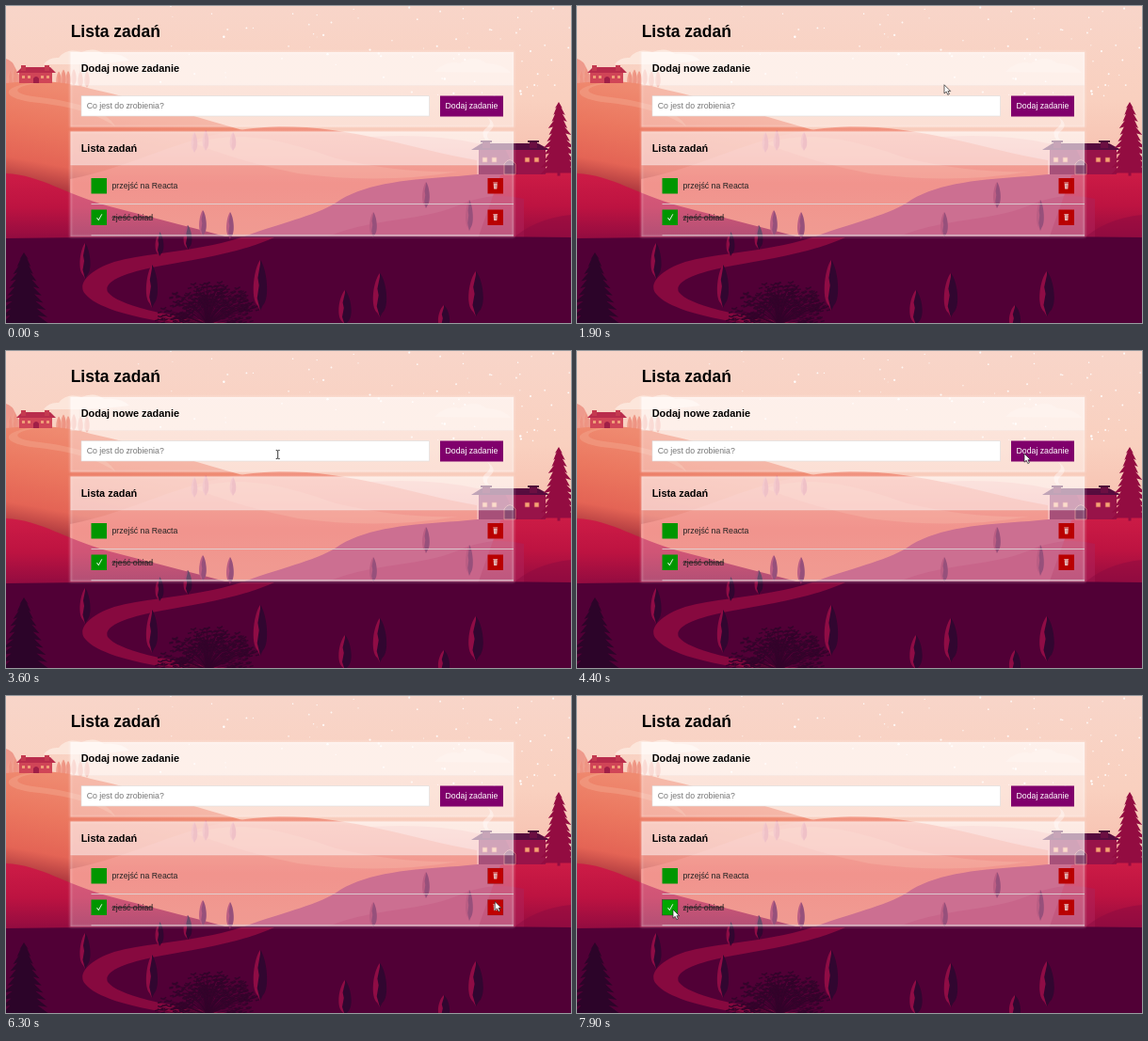
Write an HTML page that moves like this. It is 600 by 337 pixels and loops after 8 s.

```html
<!DOCTYPE html>
<html lang="pl">
<head>
<meta charset="utf-8">
<style>
  html, body { margin: 0; width: 100%; height: 100%; overflow: hidden; }
  svg { display: block; width: 100vw; height: 100vh; }
  text { font: 8.74px "Liberation Sans", Arial, sans-serif; fill: #222; }
  .head { font-size: 10.93px; font-weight: bold; fill: #000; }
  .title { font-size: 17.48px; font-weight: bold; fill: #000; }
  .small { stroke: #222; stroke-width: .7; stroke-opacity: 0; }
</style>
</head>
<body>
<svg viewBox="0 0 600 337" preserveAspectRatio="none">
  <defs>
    <linearGradient id="sky" x2="0" y2="1">
      <stop stop-color="#f8d5c9"/><stop offset=".5" stop-color="#f9d0bf"/><stop offset="1" stop-color="#f6b9a8"/>
    </linearGradient>
    <linearGradient id="left" gradientUnits="userSpaceOnUse" x1="30" y1="80" x2="10" y2="190">
      <stop stop-color="#ef8a70"/><stop offset=".4" stop-color="#eb775f"/><stop offset=".75" stop-color="#e46455"/><stop offset="1" stop-color="#a9343c"/>
    </linearGradient>
    <linearGradient id="mid" x2="0" y2="1">
      <stop stop-color="#f08e78"/><stop offset=".5" stop-color="#eb6a61"/><stop offset="1" stop-color="#ea7568"/>
    </linearGradient>
    <linearGradient id="far" x2="0" y2="1">
      <stop stop-color="#f4b0a4"/><stop offset="1" stop-color="#e8737c"/>
    </linearGradient>
    <linearGradient id="red" x2="0" y2="1">
      <stop stop-color="#cd1c46"/><stop offset=".5" stop-color="#bd1341"/><stop offset="1" stop-color="#8f0b40"/>
    </linearGradient>
    <filter id="soft" x="-5%" y="-10%" width="110%" height="120%"><feGaussianBlur stdDeviation="1.2"/></filter>
  </defs>

  <rect width="600" height="200" fill="url(#sky)"/>
  <g id="stars" fill="#fff"></g>
  <g fill="#fdeae0" opacity=".85">
    <path d="M40 62Q46 54 56 55Q64 44 80 49Q94 43 104 51Q122 49 131 58Q100 62 80 62Z"/>
    <path d="M455 70Q468 57 482 61Q497 51 510 61Q527 61 536 71Z" opacity=".4"/>
  </g>

  <path d="M0 56Q7 58 10 66Q14 76 24 84H0Z" fill="#ee9a8c"/>
  <path d="M300 150Q420 128 500 146Q560 152 600 160V220H300Z" fill="url(#far)"/>
  <g id="grove"></g>
  <path d="M0 82Q50 76 90 88C170 106 230 128 320 150L420 190V250H0Z" fill="url(#left)"/>
  <path d="M32 82C8 86 2 93 36 97C76 102 108 112 116 128C92 112 64 106 26 102C-6 97 -4 86 26 82Z" fill="#f3a58c" opacity=".5"/>
  <path d="M68 184C150 168 190 132 290 128C370 128 430 152 500 164V250H68Z" fill="url(#mid)"/>
  <path d="M200 146C250 130 300 144 350 162Q420 178 480 176Q400 190 310 178Q250 166 200 146Z" fill="#f5b39b" opacity=".25"/>
  <path d="M0 178C38 180 62 200 110 213S210 238 250 250H0Z" fill="url(#red)"/>
  <path d="M240 250C290 230 330 224 355 206C385 188 430 184 480 181Q540 174 600 178V250Z" fill="#b83766"/>
  <path d="M525 180Q560 172 600 177V250H500Z" fill="url(#red)"/>
  <path d="M330 250C390 222 440 232 490 208Q520 198 550 205V250Z" fill="#b02058" opacity=".6"/>
  <path d="M535 250Q560 226 600 222V250Z" fill="#8d0a40" opacity=".5"/>

  <path d="M502 153H572V179H502Z" fill="#850c45"/>
  <path d="M530 152H573V179H543Z" fill="#981349"/>
  <path d="M494 153L505 146H565L578 153Z" fill="#560c3e"/>
  <path d="M506 143H514V151H506ZM556 143H564V151H556Z" fill="#6c0f42"/>
  <path d="M504 143H516V145H504ZM554 143H566V145H554Z" fill="#4d0838"/>
  <path d="M529 179V168Q535 159 541 168V179Z" fill="#5c073c" stroke="#d57577" stroke-width=".8"/>
  <path d="M506 161h5v5h-5zM516 161h5v5h-5zM551 161h5v5h-5zM561 161h5v5h-5z" fill="#f4a575" stroke="#b8354f" stroke-width=".7"/>
  <path d="M509 142Q503 134 511 129Q517 124 511 118Q522 125 515 132Q508 137 513 142Z" fill="#fff" opacity=".4"/>

  <path d="M14 70H49V82H14Z" fill="#d04557"/>
  <path d="M11 71L17 65H47L53 71Z" fill="#b92c4c"/>
  <path d="M16 63H21V69H16ZM41 63H46V69H41Z" fill="#c43a50"/>
  <path d="M17 74h3v3h-3zM23 74h3v3h-3zM37 74h3v3h-3zM43 74h3v3h-3z" fill="#ef9d78"/>
  <path d="M29 82V77Q32 73 35 77V82Z" fill="#a01f47"/>

  <path d="M0 247Q300 243 600 246V337H0Z" fill="#510036"/>
  <path d="M250 246C200 262 150 262 115 272C85 282 76 297 84 306C95 320 130 330 175 337H235C170 330 118 318 108 304C103 293 125 284 160 277C205 269 250 262 285 246Z" fill="#87093f"/>
  <g id="trees"></g>
  <g id="bush" stroke="#33042b" fill="none"></g>

  <g fill="none" stroke="#fff" stroke-opacity=".35" stroke-width="1.6" filter="url(#soft)">
    <rect x="68.5" y="49" width="470.5" height="79.5"/>
    <rect x="68.5" y="133.5" width="470.5" height="111.5"/>
  </g>
  <g fill="#fff">
    <rect x="68.5" y="49" width="470.5" height="79.5" fill-opacity=".4"/>
    <rect x="68.5" y="133.5" width="470.5" height="111.5" fill-opacity=".28"/>
    <path d="M68.5 49H539V84H68.5Z" fill-opacity=".42"/>
    <path d="M68.5 133.5H539V169H68.5Z" fill-opacity=".48"/>
  </g>
  <path d="M68.5 84.3H539M68.5 169H539" stroke="#eee" stroke-opacity=".6" stroke-width=".6"/>
  <path d="M90.5 210.5H539M90.5 243.8H539" stroke="#ddd" stroke-width=".8"/>

  <text class="title" x="68.7" y="33">Lista zadań</text>
  <text class="head" x="79.7" y="70">Dodaj nowe zadanie</text>
  <text class="head" x="79.7" y="154.5">Lista zadań</text>
  <rect id="field" x="80" y="95.7" width="369.5" height="21.3" fill="#fff" stroke="#ddd" stroke-width=".6"/>
  <text x="85.7" y="109.3" style="fill:#757575">Co jest do zrobienia?</text>
  <rect x="461" y="95.5" width="67" height="22" fill="#80006c"/>
  <text x="466.5" y="109.3" style="fill:#fff">Dodaj zadanie</text>
  <g id="rows"></g>
  <text x="112.5" y="194">przejść na Reacta</text>
  <text x="112.5" y="227.6" text-decoration="line-through">zjeść obiad</text>
  <path d="M96.5 225L98.3 227.8L101.8 221.3" fill="none" stroke="#fff" stroke-width=".9"/>

  <path id="arrow" d="M0 0V9.2L2.2 7.3L3.8 10.6L5.4 9.8L3.9 6.7H6.7Z" fill="#fff" stroke="#222" stroke-width=".7"/>
  <path id="beam" d="M-2-4.5H-.6L0-4L.6-4.5H2M0-4V4M-2 4.5H-.6L0 4L.6 4.5H2" fill="none" stroke="#222" stroke-width=".9"/>
</svg>
<script>
const $ = id => document.getElementById(id);
let seed = 7;
const rnd = () => (seed = seed * 16807 % 2147483647) / 2147483647;
const add = (id, markup) => $(id).insertAdjacentHTML('beforeend', markup);

for (let i = 0; i < 90; i++) {
  add('stars', `<circle cx="${140 + rnd() * 460}" cy="${rnd() * 105}" r="${.5 + rnd() * .7}" opacity="${.6 + rnd() * .4}"/>`);
}

// Leaf-shaped tree with its lit left side
function cypress(x, top, h, w, dark = '#310630', lit = '#8f0c45', layer = 'trees') {
  const half = s => `M0 0C${s * w * .5} ${h * .15} ${s * w * .85} ${h * .75} ${s * w * .2} ${h * .9}L0 ${h}Z`;
  add(layer, `<g transform="translate(${x} ${top})"><path d="${half(-1)}" fill="${lit}"/><path d="${half(1)}" fill="${dark}"/>
    <path d="M0 ${h * .08}L${-w * .2} ${h * .35}L${-w * .1} ${h * .5}L${-w * .25} ${h * .75}L0 ${h}" fill="${dark}"/></g>`);
}
// Layered fir with ragged edges
function fir(x, top, h, w, color) {
  let left = '', right = '';
  const n = 11;
  for (let i = 1; i <= n; i++) {
    const y = top + h * i / n, r = w / 2 * (i / n) ** .7;
    right += `L${x + r * (.85 + rnd() * .25)} ${y}L${x + r * .6} ${y - h * .02}`;
    left = `L${x - r * .6} ${y - h * .02}L${x - r * (.85 + rnd() * .25)} ${y}` + left;
  }
  add('trees', `<path d="M${x} ${top}${right}${left}Z" fill="${color}"/><path d="M${x - 1.5} ${top + h * .9}h3v${h * .12}h-3Z" fill="${color}"/>`);
}

for (const x of [4, 9, 56, 61, 66, 72, 79, 86]) cypress(x, 65 + rnd() * 5, 18, 5, '#ee9483', '#f0a08e', 'grove');
[[200, 134, 22], [212, 132, 22], [241, 134, 20]].forEach(([x, y, h]) => cypress(x, y, h, 6, '#d4596b', '#e0707a'));
[[209, 217, 28], [238, 219, 29], [390, 219, 27], [446, 187, 28], [492, 206, 33]].forEach(([x, y, h]) => cypress(x, y, h, 7, '#6d0d48', '#a02054'));
[[84, 252, 38, 10], [163, 240, 26, 8], [193, 233, 26, 8], [155, 275, 46, 11], [270, 270, 54, 13], [360, 302, 38, 12],
  [397, 284, 47, 13], [465, 318, 28, 11], [499, 282, 48, 14]].forEach(a => cypress(...a));
fir(587, 102, 77, 42, '#930c41');
fir(19, 262, 84, 56, '#2c0429');

for (let i = 0; i < 110; i++) {
  const a = Math.PI * (1.03 + rnd() * .94), r = .4 + rnd() * .6;
  const x = 214 + Math.cos(a) * 56 * r, y = 338 + Math.sin(a) * 46 * r;
  add('bush', `<path d="M214 339Q${214 + (x - 214) * .35} ${y + 8} ${x} ${y}" stroke-width=".6"/>
    <path d="M${x} ${y}l3 -2m-3 2l-3 -1m1 4l-4 1m7 -1l4 -1" stroke-width="1.4"/>`);
}

for (const y of [183, 216.5]) {
  add('rows', `<rect class="small" x="90.5" y="${y}" width="16.5" height="16.5" fill="#009600"/>
    <rect class="small" x="511.5" y="${y}" width="16.5" height="16.5" fill="#b90000"/>
    <path d="M517.7 ${y + 5.8}h4l-.4 5.8h-3.2ZM517.3 ${y + 4.5}h4.8v.8h-4.8Z" fill="#eccaca"/>
    <path d="M519.1 ${y + 6.6}v4m1.3 -4v4" stroke="#b94040" stroke-width=".4"/>`);
}

// Cursor stops: time, x, y
const stops = [
  [980, 600, 74], [1100, 566, 66], [1300, 566, 66], [2700, 120, 111], [2900, 120, 111],
  [4350, 475, 109], [4550, 475, 109], [5550, 525, 193], [5750, 525, 193],
  [6500, 518, 224], [7050, 518, 224], [7700, 102, 227], [8000, 102, 227]
];
function cursorAt(t) {
  const i = stops.findIndex(s => t < s[0]);
  if (i < 1) return [-50, -50];
  const [t0, x0, y0] = stops[i - 1], [t1, x1, y1] = stops[i];
  const p = (t - t0) / (t1 - t0), e = p * p * (3 - 2 * p);
  return [x0 + (x1 - x0) * e, y0 + (y1 - y0) * e];
}
function inside(el, [x, y]) {
  const v = k => el[k].baseVal.value;
  return x >= v('x') && x <= v('x') + v('width') && y >= v('y') && y <= v('y') + v('height');
}

const buttons = document.querySelectorAll('.small');
const start = performance.now();
function draw() {
  const t = (performance.now() - start) % 8000, pos = cursorAt(t);
  const typing = inside($('field'), pos);
  for (const id of ['arrow', 'beam']) {
    $(id).setAttribute('transform', `translate(${pos})`);
    $(id).setAttribute('visibility', (id === 'beam') === typing ? 'visible' : 'hidden');
  }
  // Hover fades in with the share of the last 400 ms spent on the button
  const recent = [0, 100, 200, 300, 400].map(d => cursorAt(t - d));
  for (const b of buttons) {
    const hover = recent.filter(p => inside(b, p)).length / recent.length;
    b.style.filter = `brightness(${1 + hover * .2})`;
    b.style.strokeOpacity = hover;
  }
  requestAnimationFrame(draw);
}
draw();
</script>
</body>
</html>
```
